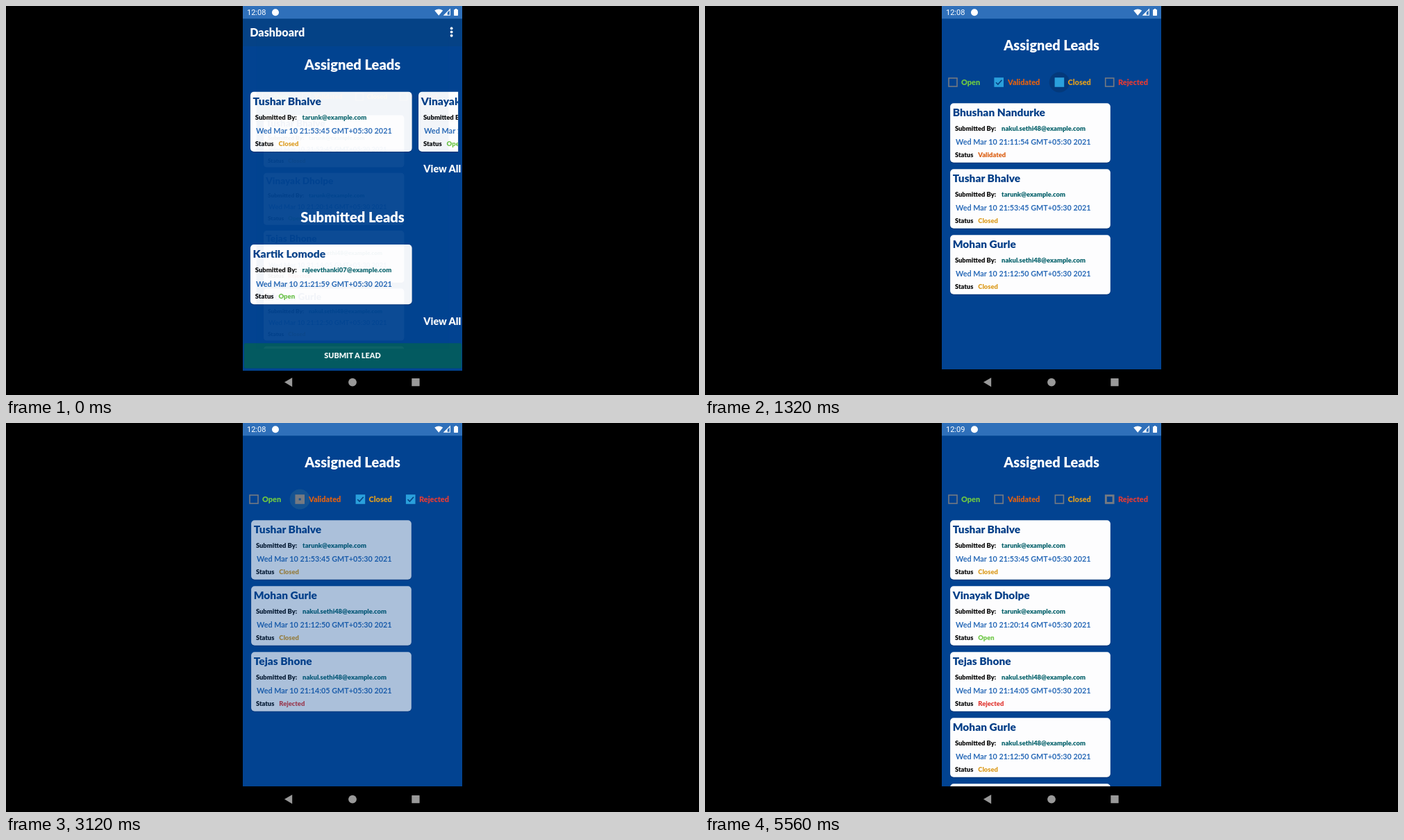
These frames come from a looping animation (998x561 px, 5.6 s). An HTML page:

```html
<!DOCTYPE html>
<html lang="en">
<head>
<meta charset="utf-8">
<title>Leads</title>
<style>
html, body { margin: 0; width: 100%; height: 100%; overflow: hidden; background: #000; }
svg { display: block; width: 998px; height: 561px; }
text { font-family: Lato, "Open Sans", sans-serif; font-weight: 900; white-space: pre; }
.clock { font-family: Roboto, sans-serif; font-weight: 400; }
.date { font-weight: 700; }
</style>
</head>
<body>
<svg id="stage" viewBox="0 0 998 561">
  <defs>
    <clipPath id="screen"><rect x="341" y="0" width="316" height="526"/></clipPath>
    <clipPath id="body"><rect x="341" y="0" width="316" height="524"/></clipPath>
    <clipPath id="row"><rect x="341" y="110" width="308.8" height="110"/></clipPath>
  </defs>
  <rect width="998" height="561"/>
  <g clip-path="url(#screen)">
    <g id="dash"></g>
    <g id="page" clip-path="url(#body)"></g>
  </g>
  <g id="bars"></g>
</svg>
<script>
const LOOP = 5600, ANIM = 280, FADE = 120;
const BG = '#024391', GREY = '#757a82', BLUE = '#2aa0dc';
const TINT = { Open: '#6cc644', Validated: '#dc6014', Closed: '#dc9c20', Rejected: '#e23b36' };

const $ = id => document.getElementById(id);
const clamp = v => Math.max(0, Math.min(1, v));
const ramp = (t, a, b) => clamp((t - a) / (b - a));
const mix = (a, b, p) => a + (b - a) * p;
const easeOut = p => 1 - (1 - p) ** 3;

function add(parent, tag, attrs, content) {
  const el = document.createElementNS('http://www.w3.org/2000/svg', tag);
  set(el, attrs);
  if (content) el.textContent = content;
  parent.appendChild(el);
  return el;
}
function set(el, attrs) {
  for (const k in attrs) el.setAttribute(k, attrs[k]);
}
// y is the middle of the capitals
function label(parent, x, y, size, fill, str, anchor = 'start', extra = {}) {
  return add(parent, 'text', { x, y: y + size * 0.36, 'font-size': size, fill, 'text-anchor': anchor, ...extra }, str);
}
function box(parent, x, y, width, height, fill, rx = 0) {
  return add(parent, 'rect', { x, y, width, height, fill, rx });
}

// leads: name, sender, time, status
const A = 'tarunk@example.com', B = 'nakul.sethi48@example.com';
const LEADS = {
  tushar: ['Tushar Bhalve', A, '21:53:45', 'Closed'],
  vinayak: ['Vinayak Dholpe', A, '21:20:14', 'Open'],
  tejas: ['Tejas Bhone', B, '21:14:05', 'Rejected'],
  mohan: ['Mohan Gurle', B, '21:12:50', 'Closed'],
  bhushan: ['Bhushan Nandurke', B, '21:11:54', 'Validated'],
  kartik: ['Kartik Lomode', 'rajeevthanki07@example.com', '21:21:59', 'Open']
};

function card(parent, x, y, key) {
  const [name, sender, time, status] = LEADS[key];
  const g = add(parent, 'g', { transform: `translate(${x} ${y})` });
  box(g, -0.3, 0.6, 231.2, 86, 'rgba(0, 25, 70, 0.35)', 5);
  box(g, 0, 0, 230.7, 85.5, '#fdfdfe', 5);
  label(g, 3.6, 13, 15.5, '#043f88', name);
  label(g, 6.8, 36.7, 9.4, '#080808', 'Submitted By:');
  label(g, 74, 36.7, 9.4, '#05616a', sender);
  label(g, 8, 56.2, 10.8, '#2a6bb8', `Wed Mar 10 ${time} GMT+05:30 2021`, 'start', { class: 'date' });
  label(g, 6.8, 74.3, 9.4, '#080808', 'Status');
  label(g, 40.2, 74.3, 9.4, TINT[status], status);
}

// dashboard
const dash = $('dash');
box(dash, 341, 0, 316, 524, BG);
box(dash, 341, 0, 316, 60, '#054286');
label(dash, 352.5, 39.9, 16, '#fff', 'Dashboard');
for (const y of [34.4, 39.6, 44.8]) add(dash, 'circle', { cx: 640.4, cy: y, r: 1.9, fill: '#fff' });
label(dash, 499, 86, 19.9, '#fff', 'Assigned Leads', 'middle');
const row = add(dash, 'g', { 'clip-path': 'url(#row)' });
card(row, 353.2, 125.2, 'tushar');
card(row, 593.2, 125.2, 'vinayak');
label(dash, 653.8, 234.9, 14.3, '#fff', 'View All', 'end');
label(dash, 499, 304.3, 19.9, '#fff', 'Submitted Leads', 'middle');
card(dash, 353.2, 343.5, 'kartik');
label(dash, 653.8, 453, 14.3, '#fff', 'View All', 'end');
box(dash, 344.2, 484.4, 310.6, 36, '#035a60', 2);
label(dash, 499, 502.2, 10.8, '#eef4f4', 'SUBMIT A LEAD', 'middle');

// list page
const page = $('page');
box(page, 341, 0, 316, 524, BG);
label(page, 499, 57, 19.95, '#fff', 'Assigned Leads', 'middle');

const checks = [['Open', 357, 369], ['Validated', 423.2, 436], ['Closed', 510.4, 522.6], ['Rejected', 582.7, 595]]
  .map(([name, x, textX]) => {
    const g = add(page, 'g', { transform: `translate(${x} 110)` });
    const ripple = add(g, 'circle', { r: 0 });
    const square = add(g, 'rect', { fill: 'none' });
    const tick = add(g, 'path', { d: 'M-4.2 .2L-1.3 3.1L4.3 -3.2', fill: 'none', stroke: '#073f82', 'stroke-width': 1.6, pathLength: 1, 'stroke-dasharray': '1 2' });
    label(page, textX, 110, 10.9, TINT[name], name);
    return { name, ripple, square, tick };
  });

// tap time, box, new state, when the new cards begin to show, cards
const TAPS = [
  [-2000, '', false, -1000, 'tushar vinayak tejas mohan bhushan'],
  [168, 'Validated', true, 250, 'bhushan'],
  [1170, 'Closed', true, 1196, 'bhushan tushar mohan'],
  [2230, 'Rejected', true, 2290, 'tushar mohan tejas bhushan'],
  [2960, 'Validated', false, 3040, 'tushar mohan tejas'],
  [3580, 'Closed', false, 3660, 'tejas'],
  [5322, 'Rejected', false, 5400, 'tushar vinayak tejas mohan bhushan']
].map(([at, name, on, show, keys]) => {
  const g = add(page, 'g', {});
  keys.split(' ').forEach((k, i) => card(g, 353.1, 140.2 + i * 95, k));
  return { at, name, on, show, g };
});

// system bars
const bars = $('bars');
box(bars, 341, 0, 316, 18.3, '#2f70ba');
const clock = label(bars, 347, 9.5, 11, '#fff', '12:08', 'start', { class: 'clock' });
add(bars, 'circle', { cx: 388, cy: 9.3, r: 5, fill: '#fff' });
add(bars, 'path', { d: 'M623.2 13.8L617.2 6.6Q623.2 2.2 629.2 6.6Z', fill: '#fff' });
add(bars, 'path', { d: 'M631 13.2L639.4 4.8V13.2Z', fill: 'none', stroke: '#fff', 'stroke-width': 1.1 });
add(bars, 'path', { d: 'M631 13.2L635.6 8.6V13.2Z', fill: '#fff' });
box(bars, 645, 5, 6, 9, '#fff', 0.8);
box(bars, 646.8, 4, 2.4, 1.5, '#fff');
box(bars, 341, 526, 316, 35, '#000');
add(bars, 'path', { d: 'M401 542.6L412.2 536V549.2Z', fill: '#999' });
add(bars, 'circle', { cx: 499, cy: 542.6, r: 5.9, fill: '#999' });
box(bars, 584.3, 537, 11.3, 11.3, '#999', 0.6);

function zoom(el, s) {
  set(el, { transform: `translate(499 280.5) scale(${s}) translate(-499 -280.5)` });
}

function drawCheck(c, t) {
  const tap = TAPS.filter(e => e.name === c.name && e.at <= t).pop();
  const on = !!tap && tap.on;
  const age = tap ? t - tap.at : 9999;
  const p = clamp(age / ANIM);
  const w = on ? mix(1.6, 6.8, clamp(p / 0.45)) : mix(6.8, 1.6, ramp(p, 0.4, 1));
  const side = 13.6 - w;
  set(c.square, { x: -side / 2, y: -side / 2, width: side, height: side, 'stroke-width': w, stroke: on && p > 0.12 ? BLUE : GREY });
  const drawn = on ? ramp(p, 0.58, 0.95) : 1 - ramp(p, 0, 0.3);
  set(c.tick, { 'stroke-dashoffset': 1 - drawn, opacity: drawn > 0 ? 1 : 0 });
  set(c.ripple, {
    r: mix(8, 14.6, easeOut(clamp(age / 110))),
    fill: on ? '#062f66' : '#2a6390',
    opacity: 0.5 * ramp(age, 0, 50) * (1 - ramp(age, 155, 235))
  });
}

function draw(t) {
  const open = easeOut(ramp(t, 0, 160));
  zoom(dash, mix(1.008, 1.05, open));
  zoom(page, mix(0.875, 1, open));
  set(page, { opacity: mix(0.035, 1, ramp(t, 0, 100)) });
  set(dash, { visibility: t < 160 ? 'visible' : 'hidden' });

  TAPS.forEach((e, i) => {
    const next = TAPS[i + 1];
    const shown = ramp(t, e.show, e.show + FADE) * (next ? 1 - ramp(t, next.at, next.show) : 1);
    set(e.g, { opacity: shown, visibility: shown > 0 ? 'visible' : 'hidden' });
  });
  checks.forEach(c => drawCheck(c, t));

  const time = t < 4080 ? '12:08' : '12:09';
  if (clock.textContent !== time) clock.textContent = time;
}

const start = performance.now();
function tick() {
  draw(Math.max(0, performance.now() - start) % LOOP);
  requestAnimationFrame(tick);
}
draw(0);
requestAnimationFrame(tick);
</script>
</body>
</html>
```
